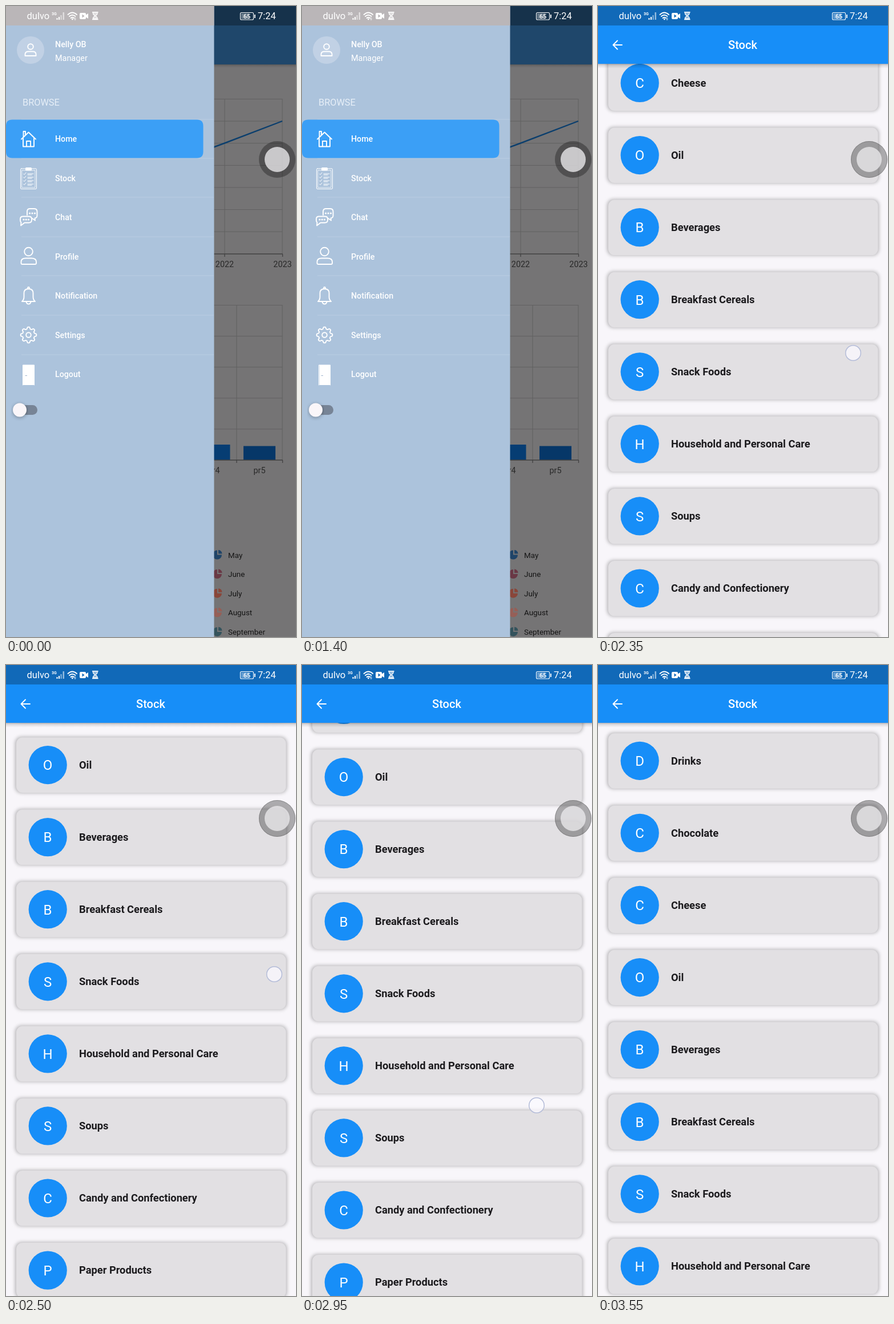
Animation of 508x1102 px, one loop 3.75 s. Source, as an HTML page:

```html
<!DOCTYPE html>
<html lang="en">
<head>
<meta charset="utf-8">
<title>Stock app</title>
<style>
  html, body { margin: 0; width: 100%; height: 100%; overflow: hidden; background: #000; }
  svg { display: block; width: 100%; height: 100%; font-family: Roboto, sans-serif; }
  .icon { fill: none; stroke: #fff; stroke-width: 1.9; stroke-linejoin: round; stroke-linecap: round; }
  .solid { fill: #fff; stroke: none; }
  .thin { stroke-width: 1; }
  .grid { stroke: #616061; stroke-width: 1; fill: none; }
  .axis { stroke: #414141; stroke-width: 1.3; fill: none; }
</style>
</head>
<body>
<svg viewBox="0 0 508 1102" preserveAspectRatio="none">
  <defs>
    <filter id="soft" x="-10%" y="-30%" width="120%" height="160%"><feGaussianBlur stdDeviation="3.2"/></filter>
    <linearGradient id="fall" x2="0" y2="1">
      <stop stop-color="#000" stop-opacity=".34"/>
      <stop offset=".4" stop-color="#000" stop-opacity=".12"/>
      <stop offset="1" stop-color="#000" stop-opacity="0"/>
    </linearGradient>
  </defs>

  <g id="home">
    <rect width="508" height="1102" fill="#757475"/>
    <g id="charts"></g>
    <rect y="101" width="508" height="7" fill="url(#fall)"/>
    <rect width="508" height="102" fill="#1f476b"/>
    <rect width="508" height="34" fill="#16324b"/>
    <rect width="364.5" height="1102" fill="#acc3dc"/>
    <rect width="364.5" height="34" fill="#bab6b8"/>
    <circle cx="43" cy="77" r="24" fill="#c1d1e5"/>
    <g class="icon">
      <circle cx="43" cy="71" r="4.8"/>
      <path d="M33.5 87v-2.5q0-5 6-5h7q6 0 6 5V87z"/>
    </g>
    <g id="menu"></g>
    <g class="icon">
      <path d="M27 232.5 39.5 220.5 52 232.5M30 231v14.5h19V231M36 245.5v-9.500h7v9.500M30.500 228.500V219h3.500v6"/>
      <g class="thin">
        <rect x="25.500" y="284" width="28" height="35.500" rx="1.500"/>
        <rect x="28" y="287" width="23" height="30" stroke-opacity=".8"/>
        <rect class="solid" x="34" y="282" width="11" height="5.500" rx="1.500"/>
        <path id="checks"/>
      </g>
      <path d="M37 365v-6q0-5 5-5h7q5.500 0 5.500 5v7q0 4-4 4.500l.5 4-5-3.500M30 367.500h10q5 0 5 4.500v1.500q0 5-5 5H32.500l-6.500 5 .5-5.500q-1.500-1-1.500-4v-2q0-4.500 5-4.500z"/>
      <g id="dots" class="solid"></g>
      <circle cx="39.500" cy="429" r="7.300"/>
      <path d="M26.500 449v-2q0-6.500 8-6.500h10q8.500 0 8.500 6.500v2q0 2-2 2H28.500q-2 0-2-2z"/>
      <path d="M28 516q3.500-3 3.500-8v-6.500q0-7.500 8-7.500t8 7.500v6.500q0 5 3.500 8zM35.500 517q1 3.500 4 3.500t4-3.500"/>
      <circle cx="39.500" cy="492.500" r="1.500"/>
      <path id="gear"/>
      <circle cx="39.500" cy="574.500" r="4.300"/>
      <path class="thin" d="M29.500 662V627h20v35"/>
      <path id="door" class="solid"/>
      <path id="knob" d="M34 645.500h2.500" stroke="#9db3cc" stroke-width="1.200"/>
    </g>
    <rect x="18" y="697" width="37" height="17" rx="8.500" fill="#778496"/>
    <circle cx="24" cy="707" r="12" fill="#000" opacity=".3" filter="url(#soft)"/>
    <circle cx="24" cy="705.500" r="12" fill="#faf6f9"/>
  </g>
  <rect id="scrim" width="508" height="1102"/>

  <g id="stock">
    <rect width="508" height="1102" fill="#f8f6fa"/>
    <svg width="508" height="1102" viewBox="0 0 508 1102"><g id="list"></g></svg>
    <rect y="100" width="508" height="9" fill="url(#fall)"/>
    <rect width="508" height="101" fill="#178ef8"/>
    <rect width="508" height="34" fill="#1169b8"/>
    <path class="icon" stroke-linecap="butt" d="M42 68H27M34 60.500 26.500 68 34 75.500"/>
    <g id="title"></g>
  </g>

  <circle id="finger" r="13.300" fill="#fbfaff" fill-opacity=".75" stroke="#b4bcd8" stroke-width="1.500"/>

  <g>
    <circle cx="475" cy="268" r="32" fill="#000" fill-opacity=".31"/>
    <circle cx="475" cy="268" r="31.500" fill="none" stroke="#555" stroke-opacity=".4"/>
    <circle cx="475" cy="268" r="22" fill="#ebe9ec" fill-opacity=".78"/>
  </g>

  <g id="status" fill="#fff">
    <path d="M88.500 24v-3h2v3zM92 24v-5h2v5z"/>
    <path d="M95.500 24v-8h2v8zM99.500 24V11h2.500v13z" opacity=".55"/>
    <g class="icon" stroke-linecap="butt" stroke-width="1.500">
      <path d="M108.500 15q7.500-7 15.500 0M111 18q5-4.500 10.500 0M113.500 21q2.700-2.500 5.500 0"/>
    </g>
    <circle cx="116.300" cy="23" r="1.400"/>
    <path d="M121 20l2 2h-4zM121 25l2-2h-4z" opacity=".8"/>
    <path fill-rule="evenodd" d="M131 12h7q2 0 2 2v1.500l4-2.500v9l-4-2.500V21q0 2-2 2h-7q-2 0-2-2v-7q0-2 2-2zM133.500 14.500v6l4-3z"/>
    <path d="M151 10h10.500v1.800h-10.500zM151 22.500h10.500v1.800h-10.500z"/>
    <path d="M152.500 12v2l3 3.200-3 3.200v2h7.500v-2l-3-3.200 3-3.200v-2" fill-opacity=".55" stroke="#fff" stroke-width="1.200"/>
    <rect x="410.500" y="11.500" width="23" height="12.500" rx="2" fill="none" stroke="#fff" stroke-width="1.100"/>
    <rect x="412" y="13" width="14" height="9.500" opacity=".35"/>
    <path d="M435 15h1.800v6H435z"/>
  </g>
</svg>

<script>
const NS = 'http://www.w3.org/2000/svg';
const $ = id => document.getElementById(id);

function add(parent, tag, attrs, label) {
  const el = document.createElementNS(NS, tag);
  for (const k in attrs) el.setAttribute(k, attrs[k]);
  if (label) el.textContent = label;
  return parent.appendChild(el);
}
const text = (parent, label, x, y, size, fill = '#fff', weight = 400, anchor = 'start') =>
  add(parent, 'text', { x, y, fill, 'font-size': size, 'font-weight': weight, 'text-anchor': anchor }, label);

// Status bar and title
text($('status'), 'dulvo', 36.5, 23, 16.5);
text($('status'), '3G', 80, 16, 7, '#fff', 700);
text($('status'), '65', 422, 21.5, 11, '#fff', 500, 'middle');
text($('status'), '7:24', 441, 23, 16.4);
text($('title'), 'Stock', 253.5, 75, 20, '#fff', 500, 'middle');

// Dimmed charts
const charts = $('charts');
let grid = 'M383 162V433M484 162V433M404 522V793M484 522V793';
for (let i = 0; i < 7; i++) grid += `M300 ${162.5 + i * 38.6}H484`;
for (let i = 0; i < 5; i++) grid += `M300 ${522.5 + i * 54.1}H484`;
add(charts, 'path', { class: 'grid', d: grid });
add(charts, 'path', { d: 'M300 270 383 239.500 484 201', fill: 'none', stroke: '#0c3f6d', 'stroke-width': 2.4 });
add(charts, 'rect', { x: 336, y: 766, width: 56.500, height: 27, fill: '#063d73' });
add(charts, 'rect', { x: 416, y: 768.5, width: 56, height: 24.5, fill: '#063768' });
add(charts, 'path', { class: 'axis', d: 'M300 433H484.500M383 433v5M484.500 433v5M300 793H484.500M404 793v5M484.500 793v5' });
[['2022', 383, 455.5], ['2023', 484.5, 455.5], ['pr4', 364, 816], ['pr5', 444, 816]]
  .forEach(([s, x, y]) => text(charts, s, x, y, 14.4, '#292929', 400, 'middle'));
[['May', '#1f4468'], ['June', '#693845'], ['July', '#89463a'], ['August', '#965f57'], ['September', '#34535c']]
  .forEach(([month, fill], i) => {
    const y = 958.5 + i * 33.6;
    add(charts, 'path', { fill, d: `M370 ${y}v-8a8 8 0 1 0 8 8zM372 ${y - 2}v-6.500a6.500 6.500 0 0 1 6.500 6.500z` });
    text(charts, month, 389, y + 5, 13.4, '#151515');
  });

// Drawer
const menu = $('menu');
text(menu, 'Nelly OB', 86, 72, 14.3, '#fff', 500);
text(menu, 'Manager', 86, 96, 14.4);
text(menu, 'BROWSE', 29, 174, 16.3, '#e6eef7');
add(menu, 'path', { d: [198, 266, 334, 403, 471, 540, 609].map(y => `M27 ${y}H364`).join(''), stroke: '#fff', 'stroke-opacity': .17 });
add(menu, 'path', { d: 'M0 209.500q0-11 11-11H334.500q11 0 11 11V254.500q0 11-11 11H11q-11 0-11-11z', fill: '#3b9ff6' });
['Home', 'Stock', 'Chat', 'Profile', 'Notification', 'Settings', 'Logout']
  .forEach((s, i) => text(menu, s, 86, 237 + i * 68.5, 14.2, '#fff', 500));

$('checks').setAttribute('d', [293, 299, 305, 311]
  .map(y => `M30.500 ${y}l1.500 1.500 3-3.500M38 ${y}h10M38 ${y + 2}h7`).join(''));
[[41.500, 362], [46, 362], [50.500, 362], [31, 373], [35.200, 373], [39.400, 373]]
  .forEach(([cx, cy]) => add($('dots'), 'circle', { cx, cy, r: 1.6 }));

let gear = '';
for (let i = 0; i < 96; i++) {
  const a = i * Math.PI / 48, r = 12.2 + 1.7 * Math.tanh(2 * Math.cos(8 * a));
  gear += `${i ? 'L' : 'M'}${(39.5 + r * Math.sin(a)).toFixed(2)} ${(574.5 - r * Math.cos(a)).toFixed(2)}`;
}
$('gear').setAttribute('d', gear + 'z');

// Stock list
['Drinks', 'Chocolate', 'Cheese', 'Oil', 'Beverages', 'Breakfast Cereals', 'Snack Foods',
 'Household and Personal Care', 'Soups', 'Candy and Confectionery', 'Paper Products', 'Canned Goods']
  .forEach((name, i) => {
    const g = add($('list'), 'g', { transform: `translate(0 ${167.3 + i * 126.08})` });
    const card = { x: 18, y: -48, width: 472.5, height: 96.5, rx: 11 };
    add(g, 'rect', { ...card, x: 16, width: 476, y: -49, height: 98, fill: '#b4b2b5', filter: 'url(#soft)' });
    add(g, 'rect', { ...card, fill: '#e2e0e3' });
    add(g, 'circle', { cx: 73.2, cy: 0, r: 33.6, fill: '#178ef8' });
    text(g, name[0], 73, 8.8, 24, '#fff', 400, 'middle');
    text(g, name, 128, 6.2, 18.3, '#1b1a1d', 700);
  });

// Motion tables: [ms, value, ...]
const LOOP = 3750, STEP = 50;
const doorKeys = [[0, 20], [250, 17], [500, 10], [750, 5], [1000, 10], [1250, 17], [1500, 20]];
const zoomKeys = [[1600, .85, 0], [1650, .91, .33], [1700, .98, 1], [1750, .9965, 1], [1850, 1, 1]];
const scrollKeys = [[2000, 0], [2050, 10], [2100, 48], [2200, 140], [2350, 285], [2450, 350], [2550, 392],
  [2650, 422], [2750, 436], [2800, 436], [2850, 420], [2950, 350], [3050, 255], [3150, 165], [3250, 95],
  [3350, 45], [3450, 14], [3550, 0]];
const swipes = [
  [[2050, 405, 885], [2200, 422, 755], [2350, 447, 606], [2500, 470, 540], [2650, 489, 496]],
  [[2800, 432, 690], [2950, 411, 769], [3100, 385, 905]]
];

function at(keys, t) {
  const i = keys.findIndex(k => k[0] >= t);
  if (i < 0) return keys[keys.length - 1].slice(1);
  if (i === 0) return keys[0].slice(1);
  const a = keys[i - 1], b = keys[i], p = (t - a[0]) / (b[0] - a[0]);
  return a.slice(1).map((v, j) => v + (b[j + 1] - v) * p);
}
const zoom = (el, s) =>
  el.setAttribute('transform', `translate(${254 * (1 - s)} ${551 * (1 - s)}) scale(${s})`);

function draw(t) {
  const [w] = at(doorKeys, t);
  const lift = (20 - w) * .06;
  $('door').setAttribute('d', `M49.500 627H${49.5 - w}V${662 - lift}L49.500 662z`);
  // The open leaf sits just inside the frame
  $('door').setAttribute('transform', `translate(${-(20 - w) * .14} 0)`);
  $('knob').style.opacity = w > 16 ? 1 : 0;

  const [scale, fade] = at(zoomKeys, t);
  const p = Math.min(1, Math.max(0, (t - 1600) / 250));
  zoom($('stock'), scale);
  $('stock').style.opacity = fade;
  zoom($('home'), 1 + .05 * p);
  $('scrim').style.opacity = .6 * Math.min(1, p * 2);

  $('list').setAttribute('transform', `translate(0 ${-at(scrollKeys, t)[0]})`);

  const swipe = swipes.find(k => t >= k[0][0] && t <= k[k.length - 1][0]);
  $('finger').style.display = swipe ? '' : 'none';
  if (swipe) $('finger').setAttribute('transform', `translate(${at(swipe, t).join(' ')})`);
}

function tick() {
  draw(Math.floor(performance.now() % LOOP / STEP) * STEP);
  requestAnimationFrame(tick);
}
tick();
</script>
</body>
</html>
```
